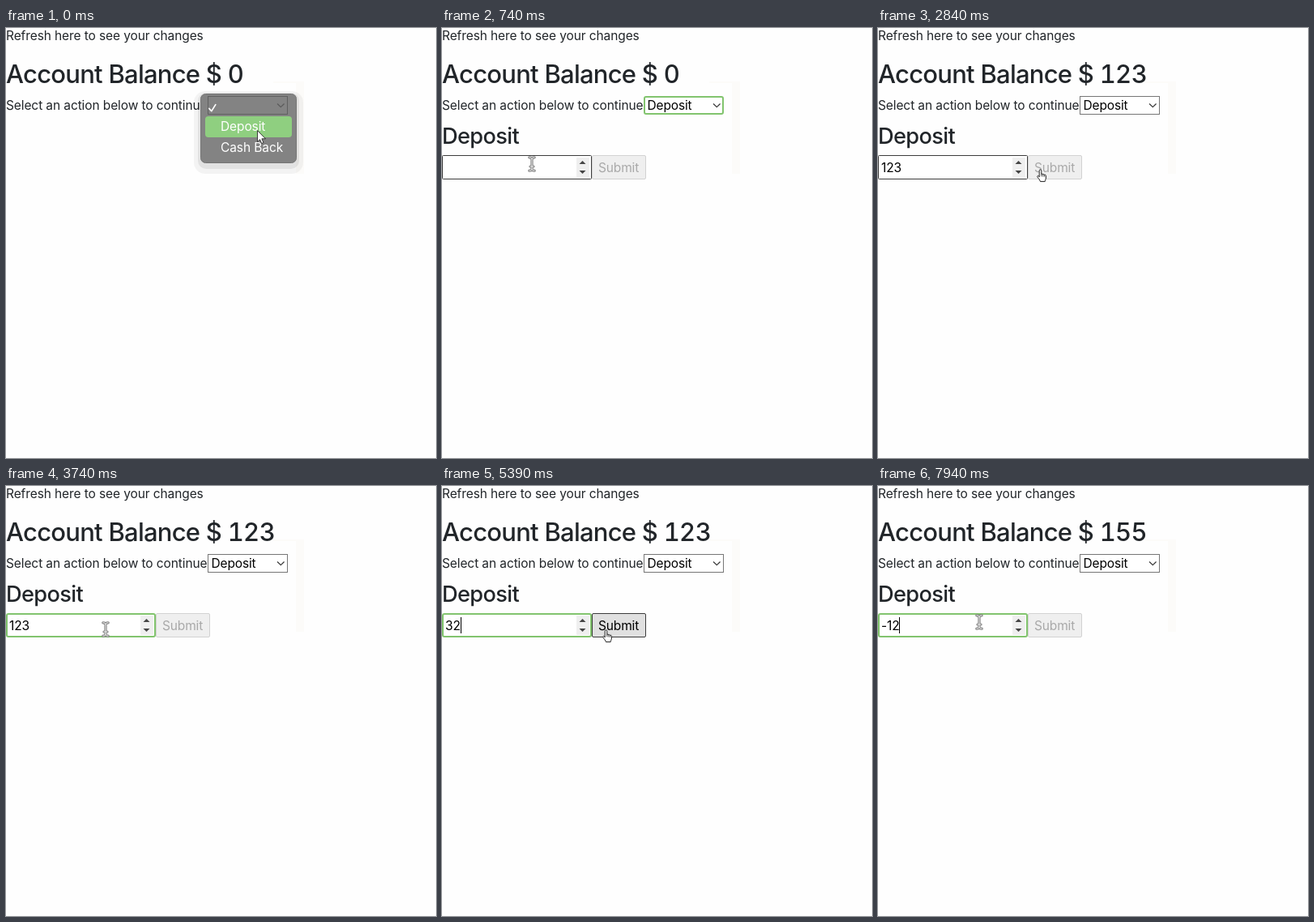
Recreate the animation shown at these times as an HTML page. Size 531 by 531 pixels, loop 8000 ms.

```html
<!DOCTYPE html>
<html lang="en">
<head>
<meta charset="utf-8">
<title>Account balance</title>
<style>
  html, body { margin: 0; width: 100%; height: 100%; overflow: hidden; background: #fefefe; }
  svg { display: block; width: 100%; height: 100%; }
  text {
    font: 420 15.5px Inter, Roboto, "Liberation Sans", sans-serif;
    font-optical-sizing: none;
    letter-spacing: -.1px;
    fill: #212529;
    white-space: pre;
  }
  .h2 { font-size: 31px; font-weight: 530; letter-spacing: -.75px; font-variant-numeric: tabular-nums; }
  .h3 { font-size: 27.2px; font-weight: 530; letter-spacing: -.65px; }
  .field text { fill: #000; letter-spacing: -.14px; }
  .menu text { fill: #fff; }
  .ring { fill: #fff; stroke: #82c46e; stroke-width: 2; }
  .line { fill: none; stroke-linecap: round; stroke-linejoin: round; }

  .button rect { fill: #efefef; stroke: #5a5a5a; }
  .button.hover rect { fill: #e0e0e0; stroke: #3c3c3c; }
  .button.press rect { fill: #f4f4f4; stroke: #8a8a8a; }
  .button.off rect { fill: #efefef; stroke: #d2d2d2; }
  .button.off text { fill: #a9a9a9; }
</style>
</head>
<body>
<svg viewBox="0 0 531 531">
  <defs>
    <path id="beam" class="line" d="M-3.2-8.2C-1-8.2 0-7.6 0-6V6C0 7.6-1 8.2-3.2 8.2M3.2-8.2C1-8.2 0-7.6 0-6M0 6C0 7.6 1 8.2 3.2 8.2M-2 3H2"/>
  </defs>

  <path d="M330 66H368V180H358V68H330z" fill="#fcfbf9"/>

  <text x="0" y="15">Refresh here to see your changes</text>
  <text class="h2" x="0" y="68">Account Balance $ <tspan id="balance">0</tspan></text>
  <text x="0" y="101">Select an action below to continue</text>

  <g class="field">
    <rect id="selectLine" x="249.5" y="84.5" width="98" height="22" fill="#fff" stroke="#767676"/>
    <rect id="selectRing" class="ring" x="250" y="85" width="97" height="21" rx="2"/>
    <text id="choice" x="253.5" y="101">Deposit</text>
    <path class="line" d="M335.3 93.8L339.3 97.6L343.3 93.8" stroke="#333" stroke-width="1.2"/>
  </g>

  <g id="form">
    <text class="h3" x="0" y="142.6">Deposit</text>
    <g class="field">
      <rect id="inputLine" x=".5" y="157.5" width="184" height="29" rx="1" fill="#fff" stroke="#3d3d3d"/>
      <rect id="inputRing" class="ring" x="1" y="158" width="183" height="28" rx="2"/>
      <rect x="166" y="160" width="16" height="24" fill="#efefef"/>
      <path d="M169.5 168L173.5 164L177.5 168zM169.5 176L173.5 180L177.5 176z" fill="#444"/>
      <text id="amount" x="4" y="178"></text>
      <rect id="caret" y="162" width="1" height="20" fill="#000"/>
    </g>
    <g id="submit" class="button field">
      <rect x="185.5" y="157.5" width="66" height="29" rx="1.5"/>
      <text x="193" y="178">Submit</text>
    </g>
  </g>

  <g id="menu" class="menu">
    <rect x="232" y="78" width="135" height="102" rx="14" fill="#000" opacity=".045"/>
    <rect x="237" y="80" width="125" height="94" rx="10" fill="#000" opacity=".07"/>
    <rect x="240.5" y="81.5" width="118" height="85" rx="6" fill="#838383" stroke="#757575"/>
    <rect x="249.5" y="84.5" width="98" height="22" fill="none" stroke="#606060"/>
    <path class="line" d="M335.3 93.8L339.3 97.6L343.3 93.8" stroke="#5a5a5a" stroke-width="1.2"/>
    <path class="line" d="M250.8 99.4L253.8 102.6L258.8 94.6" stroke="#fff" stroke-width="1.7"/>
    <rect id="highlight" x="246" y="109" width="107" height="26" rx="4" fill="#8fcf80"/>
    <text x="265" y="126.7">Deposit</text>
    <text x="265" y="152.8">Cash Back</text>
  </g>

  <g id="arrow">
    <path class="line" d="M0 0V13.6L3.1 10.7L5.2 15.6L7.5 14.6L5.4 9.8H9.7z" style="fill:#fff" stroke="#3a3a3a"/>
  </g>
  <g id="ibeam">
    <use href="#beam" stroke="#808080" stroke-width="3.2"/>
    <use href="#beam" stroke="#f0f0f0" stroke-width="1"/>
  </g>
  <g id="hand">
    <path class="line" d="M3.2 9.5V2.2a1.3 1.3 0 0 1 2.6 0V6.6c.4-.8 1.9-.6 2 .4c.5-.7 1.8-.4 1.9.5c.6-.5 1.7-.1 1.7.9V11c0 1.8-1 2.4-1.2 4.6H4.4C4 13.6 2.4 12.2.9 10c-.7-1.1.6-2.2 1.6-1.2z" style="fill:#fff" stroke="#222"/>
    <path class="line" d="M5.8 6.6V9M7.8 7V9.2M9.7 7.5V9.4" stroke="#222" stroke-width=".8"/>
  </g>
</svg>

<script>
const LOOP = 8000;
const el = id => document.getElementById(id);

const start = {
  menu: true, highlight: true, form: false, focus: "", caret: false,
  amount: "", balance: 0, button: "off", cursor: ["arrow", 310.5, 127]
};

// Each step changes only the listed parts of the state.
const steps = [
  [140, { highlight: false }],
  [290, { menu: false, form: true, focus: "select" }],
  [440, { cursor: ["arrow", 262, 139] }],
  [590, { cursor: ["ibeam", 150, 165] }],
  [740, { cursor: ["ibeam", 111, 168] }],
  [1040, { focus: "input", caret: true }],

  [1490, { amount: "1", button: "" }],
  [1640, { amount: "12" }],
  [1790, { amount: "123" }],
  [1940, { cursor: ["ibeam", 152, 175] }],
  [2090, { cursor: ["hand", 194, 173.5], button: "hover" }],
  [2240, { cursor: ["hand", 210, 174.5] }],
  [2390, { button: "press", focus: "", caret: false }],
  [2540, { button: "off", balance: 123 }],

  [2840, { cursor: ["hand", 196, 174] }],
  [2990, { cursor: ["ibeam", 146, 177] }],
  [3140, { cursor: ["ibeam", 123, 177], focus: "input", caret: true }],
  [3740, { caret: false }],
  [3890, { amount: "12", caret: true, button: "" }],
  [4040, { amount: "1" }],
  [4190, { amount: "", button: "off" }],

  [4640, { amount: "3", button: "" }],
  [4790, { amount: "32" }],
  [4940, { cursor: ["ibeam", 136, 178] }],
  [5090, { cursor: ["ibeam", 168, 180] }],
  [5240, { cursor: ["hand", 192, 176], button: "hover" }],
  [5390, { cursor: ["hand", 198, 177] }],
  [5540, { cursor: ["hand", 199, 179], button: "press", focus: "", caret: false }],
  [5690, { button: "off", balance: 155 }],

  [5840, { cursor: ["hand", 190, 175] }],
  [5990, { cursor: ["ibeam", 148, 171] }],
  [6140, { cursor: ["ibeam", 125, 168], focus: "input", caret: true }],
  [6440, { amount: "3", button: "" }],
  [6590, { amount: "", button: "off" }],
  [7190, { caret: false }],
  [7640, { amount: "-", caret: true }],
  [7790, { amount: "-1" }],
  [7940, { amount: "-12" }]
];

const show = (id, on) => el(id).style.display = on ? "" : "none";

function draw(s) {
  show("menu", s.menu);
  show("highlight", s.highlight);
  show("form", s.form);
  show("choice", s.form);
  for (const id of ["select", "input"]) {
    show(id + "Ring", s.focus === id);
    show(id + "Line", s.focus !== id);
  }
  el("balance").textContent = s.balance;
  el("amount").textContent = s.amount;
  el("submit").setAttribute("class", "button field " + s.button);

  show("caret", s.caret);
  const width = s.amount ? el("amount").getComputedTextLength() : 0;
  el("caret").setAttribute("x", 4 + Math.round(width));

  const [kind, x, y] = s.cursor;
  for (const id of ["arrow", "ibeam", "hand"]) show(id, id === kind);
  el(kind).setAttribute("transform", `translate(${x} ${y})`);
}

let shown = -1;
function tick() {
  const t = performance.now() % LOOP;
  const count = steps.filter(([at]) => at <= t).length;
  if (count !== shown) {
    shown = count;
    draw(Object.assign({}, start, ...steps.slice(0, count).map(([, change]) => change)));
  }
  requestAnimationFrame(tick);
}
tick();
</script>
</body>
</html>
```
